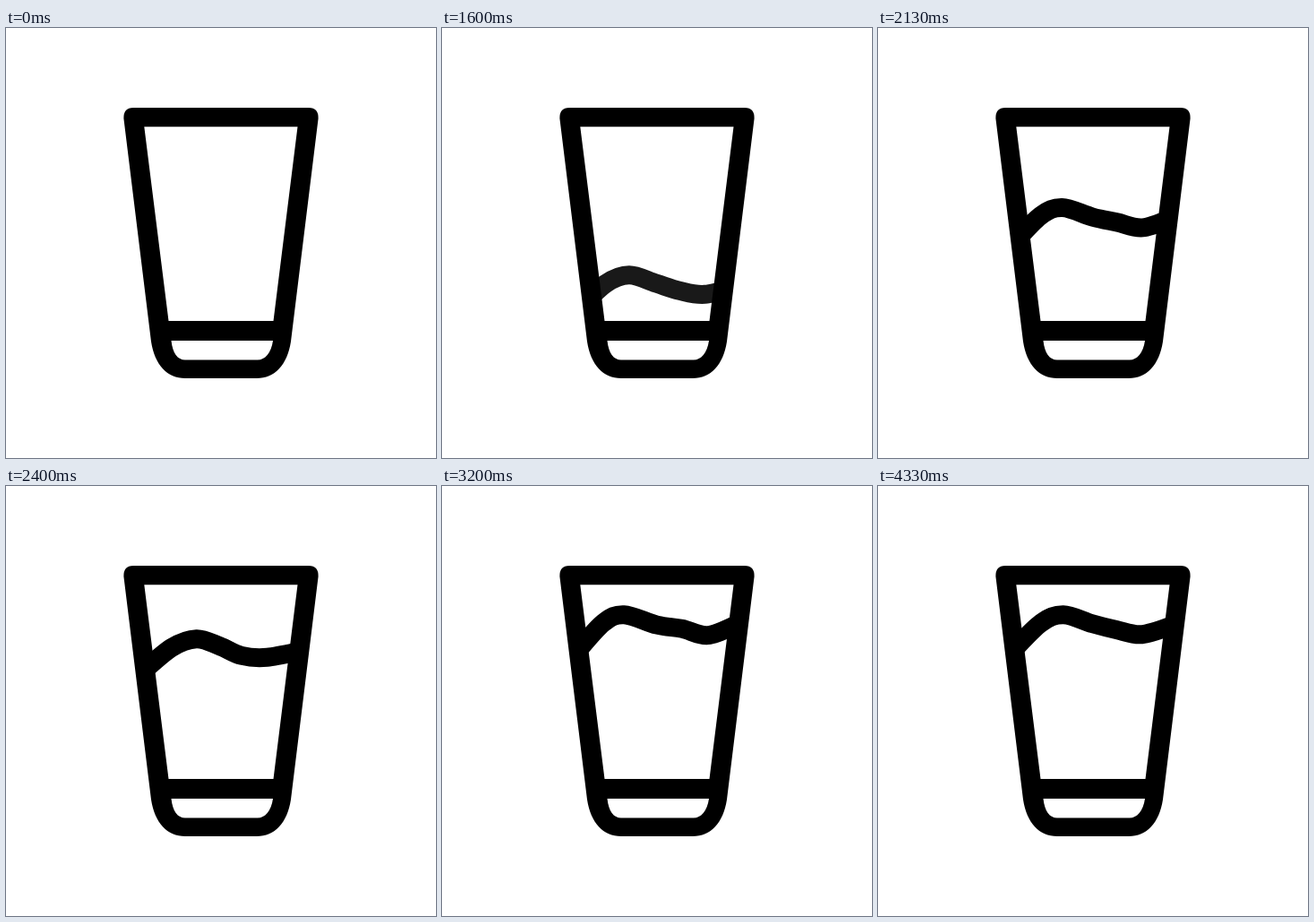
These frames come from a looping animation (480 by 480 pixels, 4.39 s). An HTML page with a canvas:

```html
<!DOCTYPE html>
<html lang="en">
<head>
<meta charset="utf-8">
<title>Filling glass</title>
<style>
  html, body { margin: 0; width: 100%; height: 100%; overflow: hidden; background: #fff; }
  canvas { display: block; width: 100vw; height: 100vh; }
</style>
</head>
<body>
<canvas id="stage" width="480" height="480"></canvas>
<script>
const ctx = document.getElementById('stage').getContext('2d');
const LOOP = 4390;
const STEP = 1000 / 15;
const WAVE_START = 1265;
const RISE_TIME = 1930;
const SWAY_TIME = 665;
const LOW = 300, HIGH = 143.7;

// Glass outline with two openings, filled even-odd
const glass = new Path2D(
  'M142 89H338Q349 89 348.6 101L318 350C314 376 300 391 280 391H200C180 391 166 376 162 350L131.4 101Q131 89 142 89Z' +
  'M154.300 110.200L181.500 327H298.500L325.500 110.200Z' +
  'M184.500 349H298C296 363 289 370.500 281 370.500H200C191.500 370.500 186 363 184.500 349Z'
);

// The two extremes of the sway: x and depth below the crest
const swayRight = [[150, 38], [186, 10], [215, 0], [238, 7], [262, 19.5], [290, 20], [331, 14]];
const swayLeft = [[150, 42], [180, 9], [203, 0], [240, 11.5], [268, 15.5], [297, 23], [331, 10]];

const clamp = v => Math.min(1, Math.max(0, v));
const mix = (a, b, k) => a + (b - a) * k;
const smooth = k => k * k * (3 - 2 * k);

// Smooth curve through all points
function curve(pts) {
  ctx.beginPath();
  ctx.moveTo(...pts[0]);
  for (let i = 0; i < pts.length - 1; i++) {
    const p = pts[i], q = pts[i + 1];
    const before = pts[i - 1] || p, after = pts[i + 2] || q;
    ctx.bezierCurveTo(
      p[0] + (q[0] - before[0]) / 6, p[1] + (q[1] - before[1]) / 6,
      q[0] - (after[0] - p[0]) / 6, q[1] - (after[1] - p[1]) / 6,
      q[0], q[1]);
  }
}

function drawWave(t) {
  const age = t - WAVE_START;
  const rise = smooth(1 - (1 - clamp(age / RISE_TIME)) ** 1.5);
  const sway = (1 - Math.cos(Math.PI * age / SWAY_TIME)) / 2;
  const crest = mix(LOW, HIGH, rise);
  curve(swayRight.map(([x, y], i) => [
    mix(x, swayLeft[i][0], sway),
    crest + mix(y, swayLeft[i][1], sway)
  ]));
  ctx.globalAlpha = clamp((age + 35) / 410);
  ctx.lineWidth = 21;
  // Keep the ends of the wave inside the walls
  ctx.save();
  ctx.clip(glassBody);
  ctx.stroke();
  ctx.restore();
  ctx.globalAlpha = 1;
}

const glassBody = new Path2D('M140 95H340L310 340H170Z');

function draw(now) {
  const t = Math.floor((now % LOOP + 3.4) / STEP) * STEP;
  ctx.fillStyle = '#fff';
  ctx.fillRect(0, 0, 480, 480);
  ctx.fillStyle = ctx.strokeStyle = '#000';
  if (t >= WAVE_START) drawWave(t);
  ctx.fill(glass, 'evenodd');
}

const start = performance.now();
function frame() {
  draw(performance.now() - start);
  requestAnimationFrame(frame);
}
frame();
</script>
</body>
</html>
```
